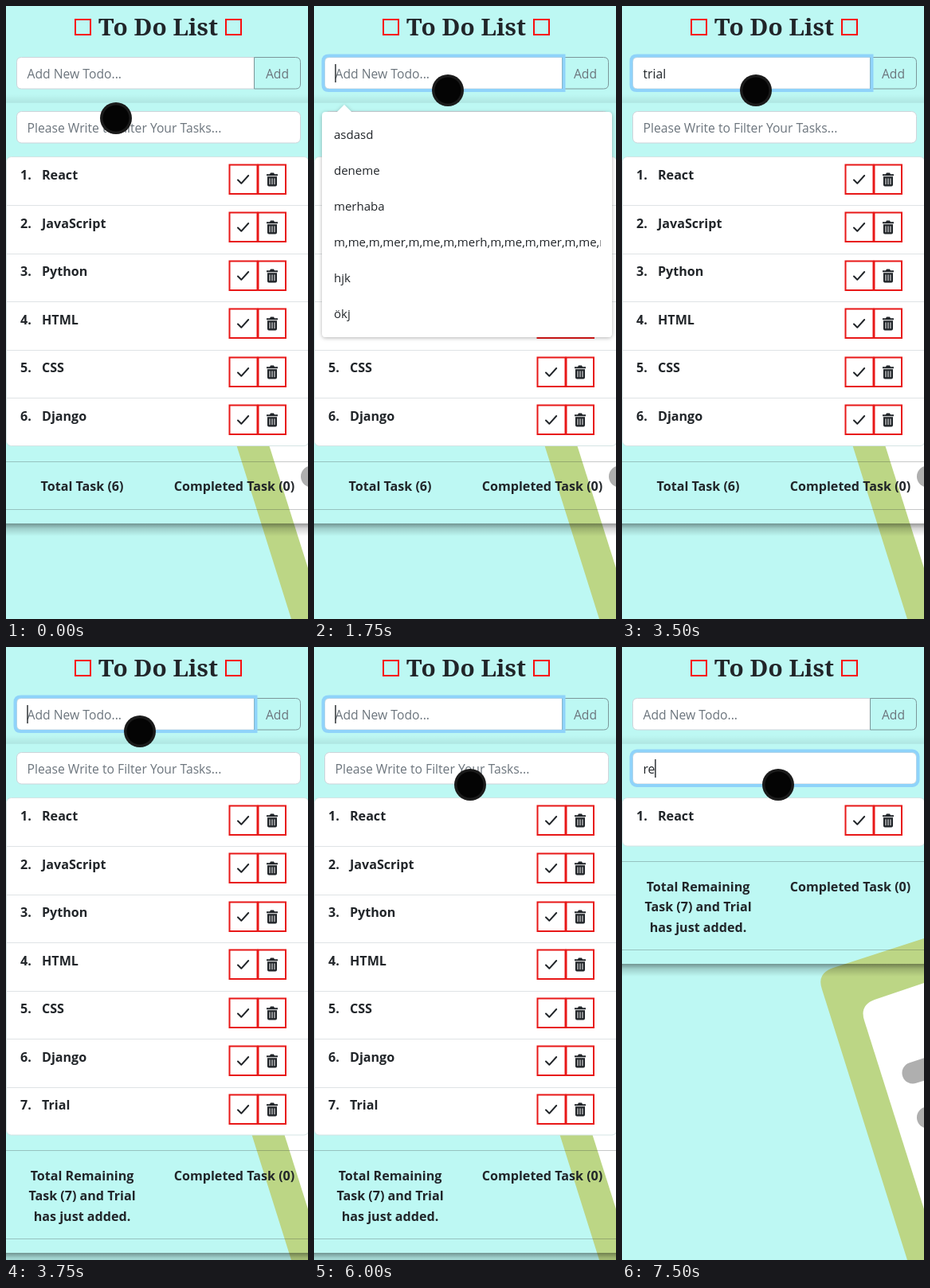
Write an HTML page that moves like this. It is 379 by 770 pixels and loops after 8 s.

```html
<!DOCTYPE html>
<html lang="en">
<head>
<meta charset="utf-8">
<title>To Do List</title>
<style>
  html, body { margin: 0; width: 100%; height: 100%; overflow: hidden; background: #bdf8f3; }
  svg { display: block; width: 379px; height: 770px; }
  text { font: 15.7px "Open Sans", "Noto Sans", sans-serif; fill: #212529; white-space: pre; }
  .title { font: bold 29.8px "Noto Serif", "Liberation Serif", serif; }
  .bold { font-weight: 700; font-size: 16.1px; }
  .mid { text-anchor: middle; }
  .muted { fill: #6c757d; }
  .menu text { font-size: 15px; }
  .field { fill: #fff; stroke: #ced4da; }
  .glow { fill: none; stroke: #8fd3fa; stroke-width: 4; }
  .rule { fill: #212529; fill-opacity: .25; }
  .caret { fill: #212529; }
</style>
</head>
<body>
<svg id="stage" viewBox="0 0 379 770" xmlns="http://www.w3.org/2000/svg">
  <defs>
    <linearGradient id="drop" x2="0" y2="1">
      <stop offset="0" stop-opacity=".4"/>
      <stop offset=".4" stop-opacity=".16"/>
      <stop offset="1" stop-opacity="0"/>
    </linearGradient>
    <linearGradient id="rise" x2="0" y2="1">
      <stop offset="0" stop-opacity="0"/>
      <stop offset="1" stop-opacity=".07"/>
    </linearGradient>
    <filter id="soft" x="-10%" y="-10%" width="120%" height="120%">
      <feDropShadow dx="0" dy="1" stdDeviation="2.5" flood-opacity=".3"/>
    </filter>
    <clipPath id="menuClip"><rect x="10" y="120" width="350" height="300"/></clipPath>
    <g id="buttons">
      <g fill="#fff" stroke="#e81818" stroke-width="2">
        <rect x="280.5" y="9.5" width="35" height="36.5"/>
        <rect x="316.5" y="9.5" width="34.5" height="36.5"/>
      </g>
      <path d="M291 28.5l4.3 4.3L304.2 23" fill="none" stroke="#212529" stroke-width="2" stroke-linecap="round" stroke-linejoin="round"/>
      <path d="M327 21.2h4l1-1.7h4l1 1.7h4v2h-14zM328 24.3h12v10.2q0 1.9-1.9 1.9h-8.2q-1.9 0-1.9-1.9z" fill="#212529"/>
      <path d="M331 26.4v7.8M334 26.4v7.8M337 26.4v7.8" stroke="#fff"/>
    </g>
  </defs>

  <rect width="379" height="770" fill="#bdf8f3"/>
  <path d="M379 366L265 403Q244 410 251 430L358 770H379Z" fill="#bcd685"/>
  <path d="M379 422L317 443Q298 450 304 469L379 706Z" fill="#fff"/>
  <path d="M365 535l40-13M383.500 591l40-13" stroke="#afafaf" stroke-width="27" stroke-linecap="round"/>

  <g fill="none" stroke="#f80d0d" stroke-width="2">
    <rect x="87" y="17" width="19" height="19"/>
    <rect x="276" y="17" width="19" height="19"/>
  </g>
  <text class="title mid" x="191" y="37">To Do List</text>

  <rect y="111" width="379" height="10" fill="url(#rise)"/>
  <rect y="121" width="379" height="1" fill="#000" fill-opacity=".05"/>
  <rect id="shadow" width="379" height="16" fill="url(#drop)"/>

  <path class="field" d="M311.500 64.500H19.500q-6 0-6 6V98q0 6 6 6H311.500z"/>
  <path d="M311.500 64.500H363.500q6 0 6 6V98q0 6-6 6H311.500z" fill="none" stroke="#7b9699"/>
  <text class="muted mid" x="340.500" y="91">Add</text>
  <rect class="field" x="13.500" y="132.500" width="356" height="39.500" rx="6"/>
  <path id="addGlow" class="glow" d="M313.500 62.500H18.500q-7 0-7 7V99q0 7 7 7H313.500z"/>
  <rect id="filterGlow" class="glow" x="11.500" y="130.500" width="360" height="43.500" rx="7"/>
  <text id="addText" x="26.500" y="91"></text>
  <text id="filterText" x="26.500" y="159"></text>

  <g id="list"></g>
  <g id="footer"></g>
  <g id="menu" class="menu">
    <path filter="url(#soft)" fill="#fff" d="M15 133H29L38 124L47 133H369q5 0 5 5V411q0 5-5 5H15q-5 0-5-5V138q0-5 5-5z"/>
    <g id="options" clip-path="url(#menuClip)"></g>
  </g>
  <rect id="caret" class="caret" width="1.400" height="23"/>
  <g id="pointer">
    <circle r="20" fill="#1b1b1b"/>
    <circle r="16.500" fill="#040404"/>
  </g>
</svg>
<script>
const LOOP = 8000, TOP = 190, ROW = 60.5;
const $ = id => document.getElementById(id);
const tasks = ['React', 'JavaScript', 'Python', 'HTML', 'CSS', 'Django', 'Trial'];
const options = ['asdasd', 'deneme', 'merhaba',
  'm,me,m,mer,m,me,m,merh,m,me,m,mer,m,me,m,merhaba', 'hjk', 'ökj'];

// Each track lists [start time, value]; values hold until the next start.
const typed = [[0, ''], [2250, 'tr'], [2500, 'tri'], [2750, 'tria'], [3000, 'trial'], [3750, '']];
const pointer = [[0, [138, 141]], [250, [170, 100]], [500, [168, 106]], [5750, [185, 149]], [6000, [196, 173]]];
const blinks = [750, 1250, 1750, 3500, 3750, 4250, 5000, 5250, 6000, 6750, 7250];
const at = (track, t) => track.filter(k => k[0] <= t).pop()[1];

const label = (x, y, s, cls = '') => `<text x="${x}" y="${y}" class="${cls}">${s}</text>`;
const rule = y => `<rect class="rule" y="${y}" width="379" height="1"/>`;
const show = (el, on) => el.setAttribute('visibility', on ? 'visible' : 'hidden');

$('options').innerHTML = options.map((s, i) => label(25, 167 + i * 45, s)).join('');

function drawList(count, added) {
  const end = TOP + count * ROW;
  let rows = `<rect x=".5" y="${TOP - .5}" width="379.500" height="${count * ROW}" rx="6" fill="#fff" stroke="#d5e4e4"/>`;
  for (let i = 0; i < count; i++) {
    const y = TOP + i * ROW;
    if (i) rows += `<rect y="${Math.round(y - .5)}" width="379" height="1" fill="#dfe3e5"/>`;
    rows += label(18, y + 28, i + 1 + '.', 'bold') + label(45, y + 28, tasks[i], 'bold') +
      `<use href="#buttons" y="${Math.round(y - .2)}"/>`;
  }
  $('list').innerHTML = rows;

  const lines = added ? ['Total Remaining', 'Task (7) and Trial', 'has just added.'] : ['Total Task (6)'];
  const low = Math.round(end - .5) + (added ? 130 : 79);
  $('footer').innerHTML = rule(Math.round(end - .5) + 19) + rule(low) +
    lines.map((s, i) => label(95.5, end + 56 + i * 25.5, s, 'bold mid')).join('') +
    label(286.5, end + 56, 'Completed Task (0)', 'bold mid');
  $('shadow').setAttribute('y', low + 18);
}

function setField(el, value, hint) {
  el.textContent = value || hint;
  el.setAttribute('class', value ? '' : 'muted');
}

let layout = '';
function render(t) {
  const added = t >= 3750;
  const query = t >= 7500 ? 're' : '';
  const count = query ? 1 : added ? 7 : 6;
  if (layout !== count + ':' + added) {
    layout = count + ':' + added;
    drawList(count, added);
  }

  const inFilter = t >= 6250, inAdd = t >= 750 && !inFilter;
  const word = at(typed, t);
  setField($('addText'), word, 'Add New Todo...');
  setField($('filterText'), query, 'Please Write to Filter Your Tasks...');
  show($('addGlow'), inAdd);
  show($('filterGlow'), inFilter);

  const value = inFilter ? query : word;
  const field = $(inFilter ? 'filterText' : 'addText');
  const width = value ? field.getComputedTextLength() : 0;
  $('caret').setAttribute('x', 26.3 + width);
  $('caret').setAttribute('y', inFilter ? 141 : 73);
  show($('caret'), blinks.filter(b => b <= t).length % 2);

  // The menu shrinks slightly while it fades away.
  const fading = t >= 2250;
  show($('menu'), t >= 750 && t < 2500);
  $('menu').setAttribute('opacity', fading ? .08 : 1);
  $('menu').setAttribute('transform', fading ? 'translate(9 11.4) scale(.96)' : '');

  $('pointer').setAttribute('transform', `translate(${at(pointer, t)})`);
}

const start = performance.now();
function tick() {
  render((performance.now() - start) % LOOP);
  requestAnimationFrame(tick);
}
render(0);
requestAnimationFrame(tick);
</script>
</body>
</html>
```
